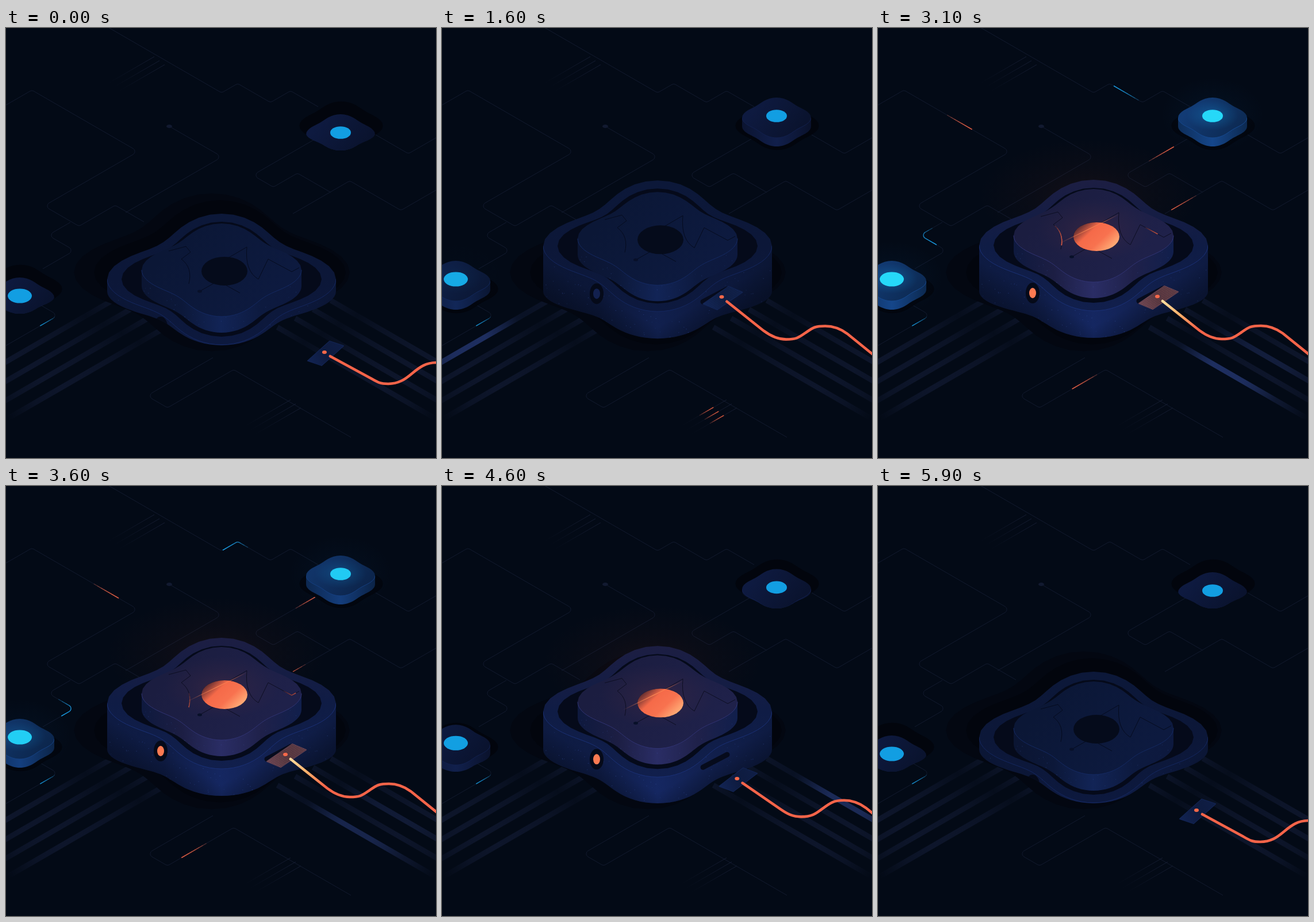
These frames come from a looping animation (748x748 px, 6 s). An HTML page with a canvas:

```html
<!DOCTYPE html>
<html lang="en">
<head>
<meta charset="utf-8">
<title>Circuit</title>
<style>
html, body { margin: 0; width: 100%; height: 100%; overflow: hidden; background: #030a16; }
canvas { display: block; width: 748px; height: 748px; }
</style>
</head>
<body>
<canvas id="stage" width="748" height="748"></canvas>
<script>
const ctx = document.getElementById('stage').getContext('2d');
const LOOP = 6000, MID = 375, SLOPE = Math.tan(Math.PI / 6), STRETCH = 1 / Math.cos(Math.PI / 6);
const ORANGE = '#f8694a', CYAN = '#20a8f0';

const clamp = v => Math.max(0, Math.min(1, v));
const part = (a, b, t) => clamp((t - a) / (b - a));
const smooth = (a, b, t) => { const p = part(a, b, t); return p * p * (3 - 2 * p); };
const cubic = p => p < .5 ? 4 * p ** 3 : 1 - 4 * (1 - p) ** 3;
const between = (a, b, c, d, t) => smooth(a, b, t) * (1 - smooth(c, d, t));
const lift = (rise, power, fall, t) => (1 - (1 - part(0, rise, t)) ** power) * (1 - cubic(part(fall, 5870, t)));

const mix = (a, b, k) => `rgb(${a.map((v, i) => Math.round(v + (b[i] - v) * k)).join()})`;
const scale = (c, k) => c.map(v => v * k);
const navy = (lit, k = 1) => mix(scale([12, 23, 56], k), scale([15, 28, 69], k), lit);
const plum = (lit, k = 1) => mix(scale([12, 24, 57], k), scale([28, 30, 67], k), lit);
const azure = (lit, k = 1) => mix(scale([13, 24, 58], k), scale([16, 54, 106], k), lit);

function gradient(x0, y0, x1, y1, ...stops) {
  const g = ctx.createLinearGradient(x0, y0, x1, y1);
  stops.forEach((c, i) => g.addColorStop(i / (stops.length - 1), c));
  return g;
}
function stroke(path, style, width = 1) {
  ctx.beginPath();
  path();
  ctx.strokeStyle = style;
  ctx.lineWidth = width;
  ctx.stroke();
}
function disc(x, y, rx, ry, fill) {
  ctx.beginPath();
  ctx.ellipse(x, y, rx, ry, 0, 0, Math.PI * 2);
  ctx.fillStyle = fill;
  ctx.fill();
}
function glow(x, y, rx, ry, rgb, alpha) {
  ctx.save();
  ctx.translate(x, y);
  ctx.scale(1, ry / rx);
  const g = ctx.createRadialGradient(0, 0, 0, 0, 0, rx);
  [1, .4, 0].forEach((k, i) => g.addColorStop(i / 2, `rgba(${rgb},${alpha * k})`));
  disc(0, 0, rx, rx, g);
  ctx.restore();
}

// Soft diamond: a polar curve pinched between its four tips.
const diamond = (rx, ry, pinch) => ({ rx, ry, pinch });
const RING = diamond(199, 114, .243), MOAT = diamond(174, 100, .25);
const BLOCK = diamond(139, 81, .21), TILE = diamond(60, 35, .17);

function arc(s, x, y, from, to, squash = 1) {
  for (let i = 0; i <= 60; i++) {
    const a = from + (to - from) * i / 60, r = 1 - s.pinch * (1 - Math.cos(4 * a)) / 2;
    ctx.lineTo(x + s.rx * r * Math.cos(a), y + s.ry * r * Math.sin(a) * squash);
  }
}
const lowerArc = (s, x, y, squash) => arc(s, x, y, Math.PI, 0, squash);
function face(s, x, y, fill, k = 1) {
  ctx.beginPath();
  arc({ ...s, rx: s.rx * k, ry: s.ry * k }, x, y, 0, Math.PI * 2);
  ctx.fillStyle = fill;
  ctx.fill();
}
function side(s, x, y, base, squash, fill) {
  ctx.beginPath();
  ctx.moveTo(x - s.rx, y);
  lowerArc(s, x, base, squash);
  ctx.lineTo(x + s.rx, y);
  ctx.fillStyle = fill;
  ctx.fill();
}
// Hides whatever is still below the floor opening.
function clipFloor(s, x, base, squash) {
  ctx.beginPath();
  ctx.moveTo(x - s.rx, 0);
  lowerArc(s, x, base, squash);
  ctx.lineTo(x + s.rx, 0);
  ctx.clip();
}

let seed = 11;
const rand = () => (seed = seed * 16807 % 2147483647) / 2147483647;
const SPECKS = Array.from({ length: 300 }, () => [rand() * 400 - 200, rand() * 175, rand()]);
function specks(y) {
  for (const [dx, dy, a] of SPECKS) {
    ctx.fillStyle = `rgba(75,110,205,${a * .4})`;
    ctx.fillRect(MID + dx, y + dy, 1.1, 1.1);
  }
}

// Steps alternate between the falling (1) and the rising (-1) axis of the floor.
function route(x, y, axis, ...steps) {
  const p = [[x, y]];
  for (const dx of steps) {
    p.push([x += dx, y += dx * SLOPE * axis]);
    axis = -axis;
  }
  return () => {
    ctx.moveTo(...p[0]);
    for (let i = 1; i < p.length - 1; i++) ctx.arcTo(...p[i], ...p[i + 1], 6);
    ctx.lineTo(...p[p.length - 1]);
  };
}
// Each trace may carry a light; `at` is its place halfway through the loop.
const TRACES = [
  { path: route(543, 137, 1, -48, -35, -57, -28, -197), color: CYAN, at: 152 },
  { path: route(0, 134, -1, 45, 185, -164, 61, 63, 50), color: ORANGE, at: 188 },
  { path: route(112, 338, -1, -39, 46, -55), color: CYAN, at: 70 },
  { path: route(565, 286, 1, -58, -42, -36, 109), color: ORANGE, at: 246 },
  { path: route(748, 282, -1, -61, -89, -99), color: ORANGE, at: 273 },
  { path: route(600, 712, 1, -204, -115, -36, 115), color: ORANGE, at: 302 },
  { path: route(284, 171, 1, 92, -168) },
  { path: route(640, 184, 1, 60, 48) }
];
const STUB = route(60, 482, 1, 31, -91);

// Nested dashes that share their leading end.
function run(path, color, head, length, alpha) {
  ctx.save();
  ctx.globalAlpha = alpha * .26;
  for (let i = 1; i <= 7; i++) {
    const n = length * i / 7;
    ctx.setLineDash([n, 2000]);
    ctx.lineDashOffset = n - head;
    stroke(path, color, 1.4);
  }
  ctx.restore();
}

function drawTraces(t) {
  const on = between(2200, 2600, 3700, 4250, t);
  for (const { path, color, at } of TRACES) {
    stroke(path, '#121a2e');
    if (color) run(path, color, at + (t - 3100) * .075, 50, on);
  }
  stroke(STUB, '#121a2e');
  run(STUB, CYAN, 64, 30, .75);
  disc(284, 171, 5, 3, '#121a30');
  const comb = between(1100, 1450, 1900, 2300, t);
  for (const [x, y] of [[178, 96], [415, 693]]) for (let i = 0; i < 3; i++) {
    const cx = x + i * 9, cy = y + i * 7, path = route(cx, cy, -1, 80);
    stroke(path, gradient(cx, cy, cx + 80, cy - 46, '#030a16', '#151d32'));
    if (y > 400) run(path, ORANGE, 66 + (t - 1600) * .06, 28, comb * .8);
  }
}

function drawBands(t) {
  const leftOn = between(1000, 1400, 2000, 2400, t), cableOn = between(2400, 2800, 3400, 3900, t);
  const lateOn = between(3600, 4000, 4500, 4900, t);
  for (const dir of [-1, 1]) for (let i = 0; i < 4; i++) {
    const x0 = MID + dir * (190 - 31 * i), y0 = 474 + 15.5 * i, x1 = x0 + dir * 275, y1 = y0 + 275 * SLOPE;
    const line = (rgb, ...alphas) => stroke(() => { ctx.moveTo(x0, y0); ctx.lineTo(x1, y1); },
      gradient(x0, y0, x1, y1, ...alphas.map(a => `rgba(${rgb},${a})`)), 9);
    line('22,31,60', .45, .15, .4, .5, .55, .4, 0);
    const bright = dir < 0 ? (i === 0 && leftOn) : i === 0 ? lateOn : cableOn * [0, .35, 0, 1][i];
    if (bright) line('42,64,134', 0, .1 * bright, .6 * bright, .55 * bright, .1 * bright, 0);
  }
}

function drawTile(x, floor, up, lit, r) {
  const y = floor + 2 - 29 * up;
  face(TILE, x + 1, floor - 13, '#02050d', 1.21);
  glow(x, y - 5, 90, 65, '10,110,190', lit * .09);
  ctx.save();
  clipFloor(TILE, x, floor, .86);
  side(TILE, x, y, y + 15, 1, gradient(x - 60, y, x + 60, y, azure(lit, .85), azure(lit, 1.3), azure(lit, .75)));
  face(TILE, x, y, gradient(x - 30, y - 28, x + 35, y + 25, azure(lit, 1.1), azure(lit, .8)));
  stroke(() => lowerArc(TILE, x, y), azure(lit, 1.35));
  glow(x, y - 4, 45, 26, '20,160,235', lit * .35);
  ctx.restore();
  disc(x, y - 3, r, r * .6, mix([18, 158, 226], [38, 216, 248], lit));
}

const ENGRAVED = [
  () => {
    ctx.moveTo(-92, -33); ctx.lineTo(-62, -41); ctx.lineTo(-54, -31); ctx.lineTo(-70, -19);
    ctx.quadraticCurveTo(-50, -4, -57, 24);
  },
  () => {
    ctx.moveTo(8, -19); ctx.lineTo(44, -40);
    ctx.quadraticCurveTo(40, 2, 64, 16);
    ctx.lineTo(81, -19); ctx.lineTo(122, 3); ctx.lineTo(135, -4);
  },
  () => { ctx.moveTo(-38, 37); ctx.lineTo(-6, 19); ctx.lineTo(32, 40); }
];

function drawBlock(t, y, lit) {
  ctx.save();
  side(BLOCK, MID, y, y + 28, 1, gradient(236, 0, 513, 0,
    navy(lit, .9), plum(lit, 1), plum(lit, 1.5), plum(lit, 1.1), navy(lit, 1.1)));
  ctx.clip();
  specks(y);
  ctx.restore();
  face(BLOCK, MID, y, gradient(300, y - 60, 450, y + 60, plum(lit, .95), plum(lit, 1.1)));
  stroke(() => lowerArc(BLOCK, MID, y), plum(lit, 1.7));
  glow(MID, y - 10, 100, 55, '140,60,60', lit * .2);

  ctx.save();
  ctx.translate(MID, y);
  for (const path of ENGRAVED) stroke(path, mix([5, 11, 30], [13, 14, 34], lit));
  disc(-38, 37, 4, 2.5, '#081029');
  const on = between(2400, 2800, 3500, 3900, t), drift = (t - 3100) * .04;
  run(ENGRAVED[0], ORANGE, 105 + drift, 38, on);
  run(ENGRAVED[1], ORANGE, 178 + drift, 24, on * .7);
  disc(5, 2, 40, 25, '#050b1b');
  ctx.globalAlpha = lit;
  disc(5, 2, 40, 25, gradient(-20, -22, 25, 26, '#5a2a2e', '#f56a49', '#f8724f', '#ffa874'));
  stroke(() => { ctx.moveTo(-60, 14); ctx.lineTo(45, -37); },
    gradient(-60, 14, 45, -37, 'rgba(255,125,75,0)', 'rgba(255,140,85,.9)', 'rgba(255,125,75,0)'), 1.3);
  ctx.restore();
}

function drawChip(t, lit) {
  const y = 437 - 59 * lift(1750, 1.6, 3780, t), blockY = 421 - 60 * lift(2000, 1.5, 3780, t);
  const base = 458, squash = (Math.min(552, y + 161) - base) / RING.ry;
  face(RING, 358, 425, '#030711', 1.205);
  face(RING, 372, 425, '#02050d', 1.1);
  glow(365, y - 85, 190, 100, '130,50,30', lit * .13);

  ctx.save();
  side(RING, MID, y, base, squash, gradient(176, 0, 574, 0,
    navy(lit, .95), navy(lit), navy(lit, 1.4), navy(lit, 1.1), navy(lit, .95)));
  ctx.clip();
  for (const dir of [-1, 1]) {
    const x = MID + dir * 150;
    ctx.fillStyle = gradient(x, y + 55, x + dir * 23, y + 95, 'rgba(3,8,20,0)', 'rgba(3,8,20,.4)');
    ctx.fillRect(MID, y, dir * 200, 200);
  }
  specks(y);
  disc(269, y + 83, 12, 18, '#050a19');
  disc(269, y + 83, 6, 9, mix([18, 32, 78], [252, 122, 82], lit));
  ctx.lineCap = 'round';
  stroke(() => { ctx.moveTo(454, y + 97); ctx.lineTo(496, y + 75); }, '#060b1c', 9);
  ctx.restore();

  ctx.save();
  clipFloor(RING, MID, base, squash);
  face(RING, MID, y, gradient(0, y - 110, 0, y + 110, plum(lit), navy(lit), navy(lit, 1.1)));
  stroke(() => lowerArc(RING, MID, y), navy(lit, 1.7));
  ctx.restore();
  face(MOAT, MID, y, '#050a1a');
  drawBlock(t, blockY, lit);
}

function drawPlug(x, y, u, hot, mesh) {
  const a = [19 + 3 * u, 2 * u - 17], b = [12, 4 + u];
  const outline = () => {
    for (const [i, j] of [[-1, -1], [1, -1], [1, 1], [-1, 1]])
      ctx.lineTo(x + a[0] * i + b[0] * j, y + a[1] * i + b[1] * j);
    ctx.closePath();
  };
  const tone = k => mix(scale([15, 30, 70], k), scale([85, 56, 68], k), hot);
  ctx.save();
  ctx.lineJoin = 'round';
  stroke(outline, tone(1.2), 2);
  ctx.fillStyle = gradient(x - 32, y + 15, x + 32, y - 15, tone(1.2), tone(.9), tone(1));
  ctx.fill();
  ctx.clip();
  ctx.setLineDash([1, 1.6]);
  const ink = mix([55, 105, 170], [235, 125, 95], hot);
  ctx.globalAlpha = mesh * .55;
  for (let k = -36; k < 40; k += 3)
    stroke(() => { ctx.moveTo(x - 36, y + k + 18); ctx.lineTo(x + 36, y + k - 18); }, ink);
  ctx.restore();
  disc(x - 2, y - 2, 4, 3, ORANGE);
}

function drawCable(t) {
  const u = lift(1750, 2, 3500, t), x = 564 - 69 * u, y = 571 - 83 * u - 13 * u * u;
  const hot = between(1800, 2500, 3550, 4050, t), mesh = between(1200, 2000, 3550, 4050, t);
  drawPlug(x - 8 + u, y - 5 - u, u, hot, mesh);

  // Straight lead, trough, crest, then a straight run off stage.
  const ax = x + 70 - 6 * u, ay = y + 38 + 13 * u, tx = x + 101 + 2 * u, ty = y + 48 + 18 * u;
  const cx = x + 185 - 14 * u, cy = y + 11 + 32 * u, mx = (tx + cx) / 2, my = (ty + cy) / 2;
  const bend = 11 - 2 * u;
  ctx.lineCap = 'round';
  stroke(() => {
    ctx.moveTo(x, y);
    ctx.lineTo(ax, ay);
    ctx.bezierCurveTo(ax + 12, ay + 7 + 2 * u, tx - 15, ty, tx, ty);
    ctx.bezierCurveTo(tx + 18, ty, mx - 13, my + bend, mx, my);
    ctx.bezierCurveTo(mx + 13, my - bend, cx - 18, cy, cx, cy);
    ctx.bezierCurveTo(cx + 15, cy, cx + 27, cy + 5, cx + 38, cy + 13);
    ctx.lineTo(cx + 158, cy + 110);
  }, gradient(x, y, x + 60, y + 48, mix([245, 100, 73], [255, 222, 160], hot),
    mix([245, 100, 73], [253, 176, 105], hot), '#f56449'), 4.6);
  ctx.lineCap = 'butt';
}

function draw(t) {
  ctx.fillStyle = '#030a16';
  ctx.fillRect(0, 0, 748, 748);
  drawBands(t);
  drawTraces(t);
  drawTile(24, 467, between(0, 750, 4300, 5050, t), between(1200, 2600, 3200, 4700, t), 21);
  drawTile(582, 183, between(380, 1290, 3940, 4860, t), between(1950, 2800, 3300, 4250, t), 18);
  drawChip(t, between(1750, 2500, 5150, 5800, t));
  drawCable(t);
}
function frame() {
  draw(performance.now() % LOOP);
  requestAnimationFrame(frame);
}
frame();
</script>
</body>
</html>
```
